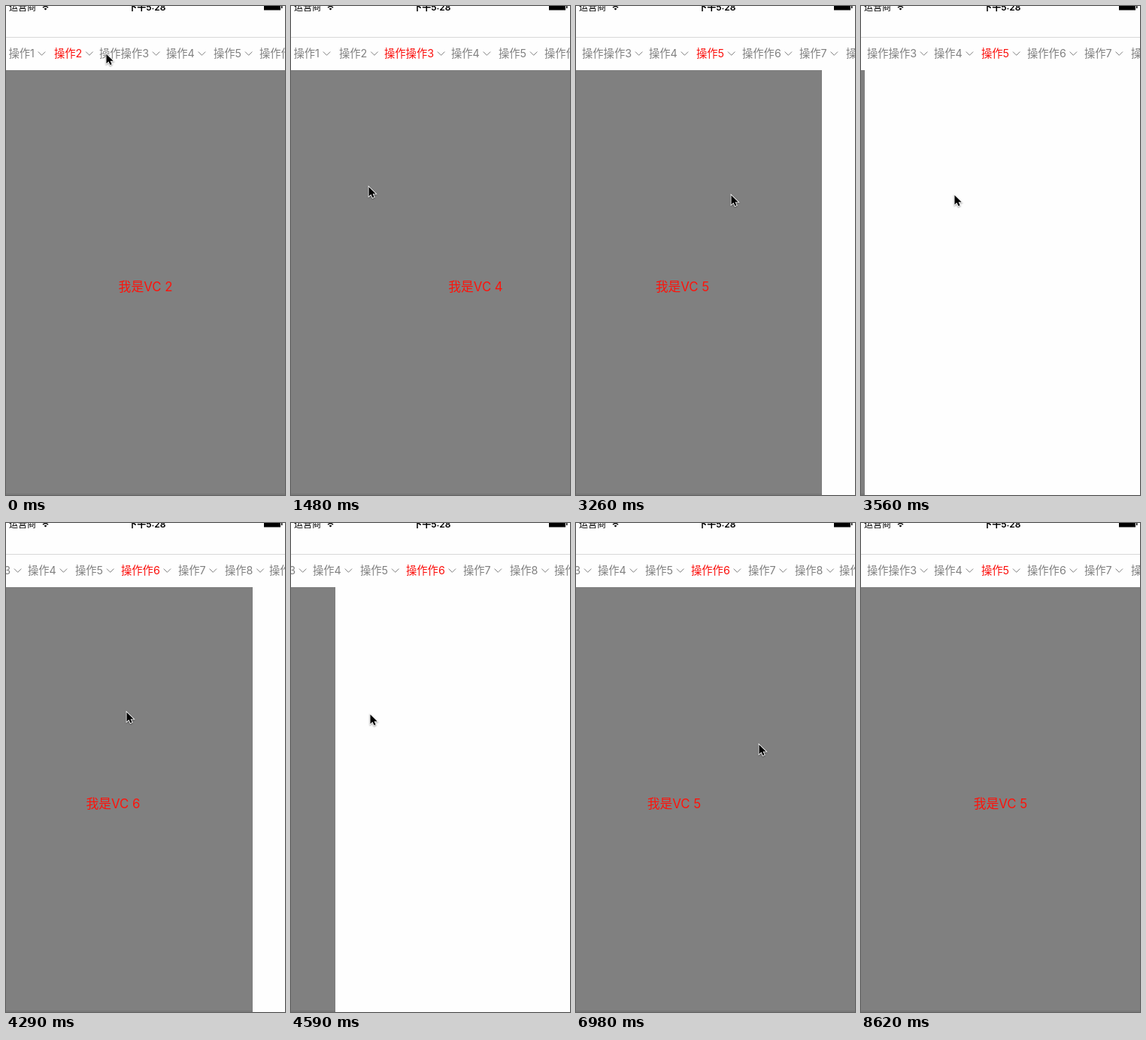
Animation, 371 px wide and 648 px high, one loop 8910 ms. Source, as an HTML page with a canvas:

```html
<!DOCTYPE html>
<html lang="zh-CN">
<head>
<meta charset="utf-8">
<title>Paged tabs</title>
<style>
  html, body { margin: 0; width: 100%; height: 100%; overflow: hidden; background: #fefefe; }
  canvas { display: block; width: 371px; height: 648px; }
</style>
</head>
<body>
<canvas id="stage"></canvas>
<script>
const W = 371, H = 648, LOOP = 8910, TICK = 148.5, PAGE_TOP = 85;
const FONT = 'Inter, "Noto Sans CJK SC", "Noto Sans CJK", sans-serif';
const GRAY = '#808080', WHITE = '#fefefe', RED = '#fb0f0c';

const canvas = document.getElementById('stage');
const ratio = window.devicePixelRatio || 1;
canvas.width = W * ratio;
canvas.height = H * ratio;
const ctx = canvas.getContext('2d');

// A tap, then swipes: page reached, start and end in ticks, pointer at press and at lift.
const FIRST_PAGE = 2, PRELOADED = 4;
const gestures = [
  { page: 3, start: 2.5, end: 3, press: [133, 63], lift: [133, 63] },
  { page: 4, start: 7.6, end: 10.82, press: [281, 236], lift: [86, 238] },
  { page: 5, start: 15.2, end: 18.02, press: [235, 247], lift: [130, 248] },
  { page: 6, start: 21.4, end: 24.19, press: [262, 250], lift: [98, 250] },
  { page: 7, start: 28.2, end: 31.95, press: [188, 249], lift: [105, 252] },
  { page: 6, start: 37.5, end: 40.5, press: [105, 256], lift: [244, 273] },
  { page: 5, start: 44.5, end: 47.8, press: [110, 277], lift: [243, 293] }
];
const exit = { start: 50, end: 58, to: [354, 650] };

const mix = (a, b, k) => a + (b - a) * k;
const mixPoint = (a, b, k) => a.map((v, i) => mix(v, b[i], k));
const progress = (t, start, end) => Math.min(1, Math.max(0, (t - start) / (end - start)));
const smooth = k => k * k * (3 - 2 * k);

function pagePosition(tick) {
  return gestures.reduce(
    (pos, g) => mix(pos, g.page, smooth(progress(tick, g.start, g.end))), FIRST_PAGE);
}

// The pointer lifts halfway through a swipe, then glides to the next press.
function pointerAt(tick) {
  let point = gestures[0].press;
  for (const { start, end, press, lift } of gestures) {
    const released = mix(start, end, 0.55);
    const previous = gestures.findLast(g => g.end < start);
    if (previous) {
      const left = mix(previous.start, previous.end, 0.55);
      point = mixPoint(point, press, smooth(progress(tick, left, left + 3)));
    }
    point = mixPoint(point, lift, smooth(progress(tick, start, released)));
  }
  return mixPoint(point, exit.to, progress(tick, exit.start, exit.end));
}

function rect(x, y, w, h, color) {
  ctx.fillStyle = color;
  ctx.fillRect(x, y, w, h);
}

function text(str, x, y, size, color, weight = 400, align = 'left') {
  ctx.font = `${weight} ${size}px ${FONT}`;
  ctx.textAlign = align;
  ctx.fillStyle = color;
  ctx.fillText(str, x, y);
}

const TAB_SIZE = 14.3;
const tabStarts = [3.5, 64, 124, 213, 276, 337, 413, 475, 534];
const tabNames = { 3: '操作操作', 6: '操作作', 9: '操作操作操作' };
ctx.font = `400 ${TAB_SIZE}px ${FONT}`;
const tabs = tabStarts.map((x, i) => {
  const title = (tabNames[i + 1] || '操作') + (i + 1);
  const chevron = x + ctx.measureText(title).width + 9.6;
  const centered = Math.floor((x + chevron + 5 - W) / 2);
  return { title, x, chevron, scroll: Math.max(0, centered) };
});

function drawPages(tick) {
  const position = pagePosition(tick);
  for (let page = FIRST_PAGE; page <= 7; page++) {
    const x = Math.round((page - position) * W);
    const loaded = page <= PRELOADED || gestures.some(g => g.page === page && g.end <= tick);
    if (Math.abs(x) >= W || !loaded) continue;
    rect(x, PAGE_TOP, W, H - PAGE_TOP, GRAY);
    rect(x, H - 2, W, 2, 'rgba(0,0,0,.06)');
    text('我是VC ' + page, x + W / 2, 377.5, 16.8, '#ff120a', 400, 'center');
  }
}

function drawTabs(tick) {
  let selected = FIRST_PAGE, scroll = 0;
  for (const g of gestures.filter(g => g.end <= tick)) {
    selected = g.page;
    scroll = mix(scroll, tabs[selected - 1].scroll, tick - g.end < 1 ? 0.45 : 1);
  }
  ctx.save();
  ctx.translate(-Math.round(scroll), 0);
  tabs.forEach(({ title, x, chevron }, i) => {
    text(title, x, 68, TAB_SIZE, i + 1 === selected ? RED : GRAY);
    ctx.beginPath();
    ctx.moveTo(chevron - 4.7, 60.6);
    ctx.lineTo(chevron, 65.3);
    ctx.lineTo(chevron + 4.7, 60.6);
    ctx.strokeStyle = GRAY;
    ctx.lineWidth = 1;
    ctx.stroke();
  });
  ctx.restore();
}

function drawStatusBar() {
  text('运营商', 4, 5.5, 12, '#000');
  text('下午5:28', 187.3, 5.5, 12, '#000', 600, 'center');
  const wedge = [-Math.PI * 0.75, -Math.PI * 0.25];
  ctx.beginPath();
  ctx.moveTo(52.5, 5.5);
  ctx.arc(52.5, 5.5, 2.6, ...wedge);
  ctx.fill();
  ctx.beginPath();
  ctx.arc(52.5, 5.5, 4.8, ...wedge);
  ctx.strokeStyle = '#000';
  ctx.lineWidth = 1.5;
  ctx.stroke();
  rect(343, 0, 22, 5.5, '#000');
  rect(366, 0, 1.5, 3, '#000');
  rect(0, 41, W, 1, '#d8d8d8');
}

const arrow = new Path2D('M.5 .8V14.2L3.7 11.3L5.9 16.2L8.2 15.2L6 10.5H10.4Z');

function drawPointer(x, y) {
  ctx.save();
  ctx.translate(Math.round(x), Math.round(y));
  ctx.scale(0.93, 0.93);
  ctx.shadowColor = 'rgba(0,0,0,.4)';
  ctx.shadowBlur = 2 * ratio;
  ctx.shadowOffsetY = ratio;
  ctx.strokeStyle = '#fff';
  ctx.lineWidth = 1.8;
  ctx.stroke(arrow);
  ctx.shadowColor = 'transparent';
  ctx.fillStyle = '#000';
  ctx.fill(arrow);
  ctx.restore();
}

// The screen refreshes in coarse ticks.
function draw(ms) {
  const tick = Math.floor(ms / TICK + 0.14);
  ctx.setTransform(ratio, 0, 0, ratio, 0, 0);
  rect(0, 0, W, H, WHITE);
  drawPages(tick);
  drawTabs(tick);
  drawStatusBar();
  if (tick < exit.end) drawPointer(...pointerAt(tick));
}

const start = performance.now();
function loop() {
  draw((performance.now() - start) % LOOP);
  requestAnimationFrame(loop);
}
loop();
</script>
</body>
</html>
```
